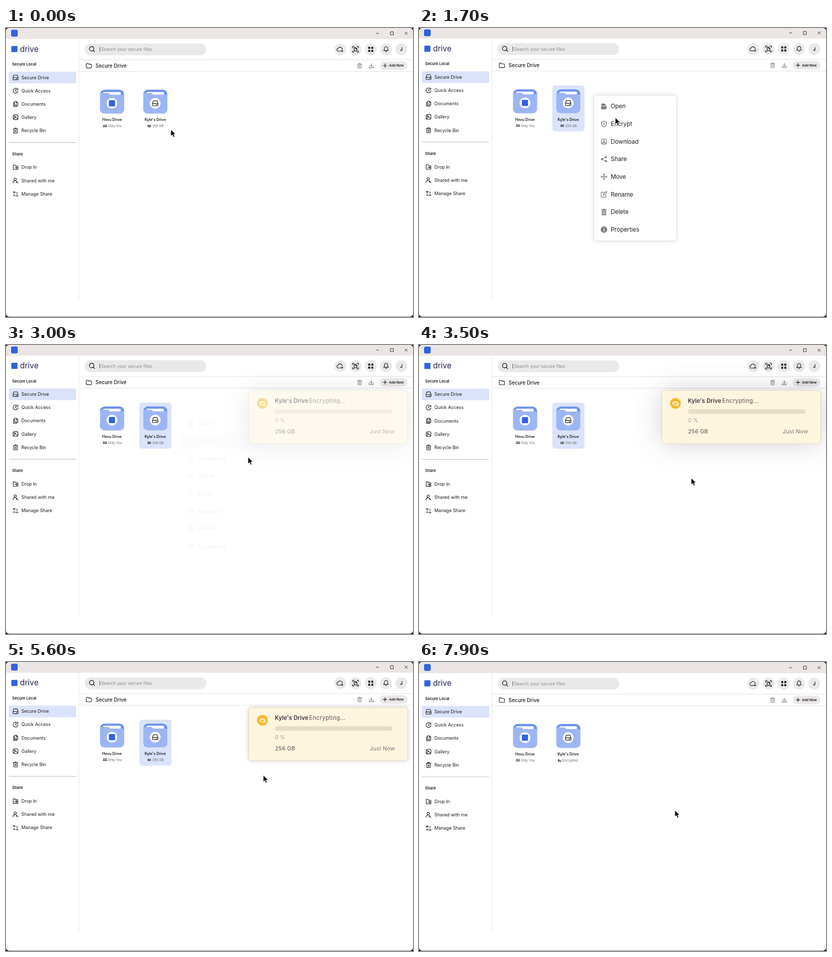
An HTML page for the animation above (8 s loop, 800x569 px).

```html
<!DOCTYPE html>
<html lang="en">
<head>
<meta charset="utf-8">
<title>Secure drive</title>
<style>
html, body { margin: 0; width: 100%; height: 100%; overflow: hidden; background: #000; }
svg { display: block; width: 800px; height: 569px; font-family: Inter, Lato, sans-serif; }
text { white-space: pre; }
</style>
</head>
<body>
<svg viewBox="0 0 800 569">
  <clipPath id="frame"><rect width="800" height="568.4" rx="6"/></clipPath>
  <g clip-path="url(#frame)">
    <rect width="800" height="569" fill="#fff"/>
    <g id="app"></g>
    <g id="menu"></g>
    <g id="card"></g>
    <path id="arrow" d="M0 0V13L3 10.2 5.2 15 7.5 14 5.4 9.3H9.4Z" fill="#000" stroke="#fff" stroke-width=".8"/>
    <path id="hand" d="M-3-6.2q1.5-1.6 2.7 0V-1.5q1.2-1 2 .2 1.3-.9 2 .4 1.6-.6 2 .9v3.6Q5.5 5.5 4.4 8h-6Q-2.6 5.6-5.8 2.2q-.8-1.6 1-1.7L-3 1.7ZM-.3-1.5V1.5M1.7-1.1V1.7M3.7-.7V2M0 4v2M2 4v2"
      fill="#fff" stroke="#111" stroke-width="1" stroke-linejoin="round"/>
  </g>
</svg>
<script>
const $ = id => document.getElementById(id);
const INK = '#1c1c1c', TINT = '#dbe3fb', BLUE = '#2f62e0';

const text = (x, yMid, size, str, attr = '') =>
  `<text x="${x}" y="${yMid + size * .36}" font-size="${size}" fill="${INK}" ${attr}>${str}</text>`;
const rect = (x, y, w, h, fill, r = 0, attr = '') =>
  `<rect x="${x}" y="${y}" width="${w}" height="${h}" rx="${r}" fill="${fill}" ${attr}/>`;
const circle = (x, y, r, fill) => `<circle cx="${x}" cy="${y}" r="${r}" fill="${fill}"/>`;
const line = (d, color, w = 1) => `<path d="${d}" fill="none" stroke="${color}" stroke-width="${w}"/>`;
const icon = (x, y, d, color = INK, scale = 1, w = 1.1) =>
  `<path transform="translate(${x} ${y}) scale(${scale})" d="${d}" fill="none" stroke="${color}" stroke-width="${w}" stroke-linecap="round" stroke-linejoin="round"/>`;
const solid = (x, y, d, color) =>
  `<path transform="translate(${x} ${y})" d="${d}" fill="${color}" fill-rule="evenodd"/>`;

const shape = {
  drive: 'M-5 .5L-3.6-3.8q.3-.8 1.2-.8h4.8q.9 0 1.2.8L5 .5V3.6q0 1-1 1H-4q-1 0-1-1ZM-5 .5H5M1.6 2.6H3',
  clock: 'M3-3.8A4.8 4.8 0 1 0 4.8 .5M0-2.6V.5L2 1.5M4.6-4.6V-2H2',
  docs: 'M-2-5H1.8L4.4-2.4V3H-2ZM1.6-5V-2.2H4.2M-2-3H-4V5H2.4V3M0 .5H2.4',
  gallery: 'M-4.7-2q0-2.7 2.7-2.7h4q2.7 0 2.7 2.7v4q0 2.7-2.7 2.7h-4q-2.7 0-2.7-2.7ZM-4 3.6L.4-.6 4 3.4M-2.8-1.6a.9.9 0 1 0 1.8 0 .9.9 0 1 0-1.8 0',
  trash: 'M-4.5-3.2h9M-1.5-3.2V-5h3v1.8M-3.5-3.2V5h7V-3.2M-.9-.8V2.6M.9-.8V2.6',
  dropIn: 'M0-2.5L-1-4.5H-4.5V4.5H4.5V-2.5H0M-1.5 1H3M1.4-.8L3.2 1 1.4 2.8',
  person: 'M-3-2.5a2.3 2.3 0 1 0 4.6 0a2.3 2.3 0 1 0-4.6 0M-5 5q0-4.4 4.2-4.4M1.2 2L4.8 5.2M1.2 4V2H3.2',
  manage: 'M-2.8-5V-1M-2.8 1V3.5H0M2 3.5H5M-5-3.2H0M2.8-3.2V0M2.8 2V5M-4.5 3.5h-.4',
  folder: 'M-5.2-3.4q0-1 1-1h2.6l1.5 1.6h4.2q1 0 1 1V3.4q0 1-1 1H-4.2q-1 0-1-1Z',
  download: 'M0-4.5V1.5M-2.6-1L0 1.6 2.6-1M-4.3 1.6V4.3H4.3V1.6',
  plus: 'M-3.6 0H3.6M0-3.6V3.6',
  cloud: 'M1 4H-3.2A2.8 2.8 0 0 1-3.6-1.6A3.8 3.8 0 0 1 3.6-1.6Q4.6-1.4 5-.4M4 1V5.4M1.8 3.2H6.2',
  scan: 'M-5.6-3V-5.6H-3M3-5.6H5.6V-3M5.6 3V5.6H3M-3 5.6H-5.6V3M-2.6-3.4H.6L2.8-1.2V3.4H-2.6ZM.4-3.2V-1H2.6',
  bell: 'M-4.6 2.8Q-3.2 1.4-3.2-1.2A3.2 3.6 0 0 1 3.2-1.2Q3.2 1.4 4.6 2.8ZM-1.2 4.8H1.2'
};

const folder = (x, y, badge) => `<g transform="translate(${x} ${y})">` +
  rect(-.6, .2, 48.2, 47.6, '#d9dde8', 9) +
  rect(0, 0, 47, 46.5, '#6d93f0', 9) +
  rect(6, 4.4, 34.5, 8, '#fff', 1.5) +
  '<path d="M0 9Q0 6.6 2.4 6.6H15.5Q17.2 6.6 18 8.2T20.5 9.8H44.6Q47 9.8 47 12V37.5Q47 46.5 38 46.5H9Q0 46.5 0 37.5Z" fill="#9cb5f5"/>' +
  circle(23.3, 26.8, 10.6, '#fff') + badge + '</g>';

function sidebar() {
  const items = [
    [97.3, 'Secure Drive', 'drive'], [123.5, 'Quick Access', 'clock'], [149.7, 'Documents', 'docs'],
    [175.8, 'Gallery', 'gallery'], [202, 'Recycle Bin', 'trash'], [274.2, 'Drop In', 'dropIn'],
    [300.3, 'Shared with me', 'person'], [326.5, 'Manage Share', 'manage']];
  return rect(10.5, 35.5, 12, 12, BLUE, 1) +
    text(27.5, 41, 15.4, 'drive', 'style="fill:#20234f"') +
    text(12, 71.3, 7.6, 'Secure Local', 'font-weight="600"') +
    rect(5.5, 86, 132.5, 23, TINT, 2) +
    line('M5.5 225.5H137.5', '#b9b9b9') +
    text(12, 248, 7.6, 'Share', 'font-weight="600"') +
    items.map(([y, label, s]) => icon(18.8, y, shape[s]) + text(30.3, y, 8.9, label)).join('') +
    line('M143.2 21V533', '#e4e4e4');
}

function header() {
  const dots = [-3, 3].map(x => [-3, 3].map(y => rect(715 + x, 40 + y, 4, 4, INK, 1)).join('')).join('');
  return rect(0, -3, 800, 24.4, '#ebe5e4') + rect(10, 3.5, 13, 13.5, BLUE, 3) +
    line('M727.5 10.5H733M755.5 7.5H761.5V13.5H755.5ZM783.8 7.8L789.2 13.2M789.2 7.8L783.8 13.2', '#222', .9) +
    rect(154.5, 30.5, 239, 23.2, '#e9e9e9', 11.6) +
    icon(169, 41.5, 'M-5-.6a4.4 4.4 0 1 0 8.8 0a4.4 4.4 0 1 0-8.8 0M2.7 2.7L5.4 5.4', INK, 1, 1.3) +
    line('M184.5 37.5V46.5', '#333', .9) +
    text(187, 42.2, 8.75, 'Search your secure files', 'style="fill:#8b8b8b"') +
    [657, 687, 717, 747, 777].map(x => circle(x, 42, 11.6, '#ebe8e8')).join('') +
    icon(656.5, 41.8, shape.cloud) + icon(687, 42, shape.scan, INK, 1, 1.3) + dots +
    icon(747, 41.6, shape.bell) +
    text(777, 42.2, 8.6, 'J', 'font-weight="700" text-anchor="middle"') +
    line('M143.5 62.5H800M143.5 85.5H800', '#e2e2e2') +
    icon(163, 74.2, shape.folder) +
    text(176, 74.4, 9.9, 'Secure Drive', 'font-weight="500"') +
    icon(695, 74.2, shape.trash, '#666', .92, .9) + icon(718, 74.4, shape.download, '#555', .95, 1) +
    rect(734.5, 65.7, 54.5, 16.8, '#ebe8e8', 8.4) + icon(745, 74, shape.plus, INK, 1, 1.2) +
    text(753, 74, 6.55, 'Add New', 'font-weight="600"');
}

function folders() {
  const name = (x, str) => text(x, 180.8, 7.25, str, 'font-weight="600" text-anchor="middle"');
  const note = (x, str) => text(x, 193, 6.45, str, 'style="fill:#666"');
  const people = [191.8, 194.5, 197.2].map(x =>
    circle(x, 191.3, 1.15, '#555') + rect(x - 1.3, 192.8, 2.6, 2.4, '#555', .8)).join('');
  return `<g id="tile">${rect(262, 113.7, 63.3, 90.8, TINT, 6)}</g>` +
    folder(185, 121.5, rect(17.3, 20.8, 12, 12, BLUE, 1)) +
    folder(270, 121.5, icon(23.3, 26.8, shape.drive, INK, 1.08)) +
    name(208.3, 'Hevu Drive') + name(293.3, "Kyle's Drive") + people + note(200.3, 'Only You') +
    `<g id="size">${rect(278, 190.8, 7, 4.6, '#666', 1.4)}${line('M279.4 193H283.6', '#bbb', .7)}${note(287.4, '256 GB')}</g>` +
    `<g id="locked">${solid(276, 193, 'M-3 3V-2.4H-.8L0-1.2H1V3ZM.6 0H3.2V3.2H.6Z', '#666')}${note(281, 'Encrypted')}</g>`;
}

function menu() {
  const gray = '#7c7c7c';
  const items = [
    ['Open', (x, y) => solid(x, y, 'M-5-5.5H1L4-2.6V-1H-5ZM-5.6 0H6L4.2 5.6H-5.6Z', gray)],
    ['Encrypt', (x, y) => icon(x, y, 'M0-5.6L4.8-3.8V0Q4.6 4 0 5.8Q-4.6 4-4.8 0V-3.8ZM0-.6V2.2M-.9-1.4H.9', gray, 1, 1.4)],
    ['Download', (x, y) => icon(x, y, 'M-5-3q0-2 2-2H3q2 0 2 2V3q0 2-2 2H-3q-2 0-2-2ZM0-3V.4M-1.6-1L0 .6 1.6-1M-4.6 2.4H4.6', gray, 1, 1.3)],
    ['Share', (x, y) => icon(x, y, 'M4-4L-4 0L4 4', gray, 1, 1.2) + circle(x + 4, y - 4, 2, gray) + circle(x - 4, y, 2, gray) + circle(x + 4, y + 4, 2, gray)],
    ['Move', (x, y) => icon(x, y, 'M0-5.4V5.4M-5.4 0H5.4M-1.5-4.2L0-5.6 1.5-4.2M-1.5 4.2L0 5.6 1.5 4.2M-4.2-1.5L-5.6 0-4.2 1.5M4.2-1.5L5.6 0 4.2 1.5', gray, 1, 1.3)],
    ['Rename', (x, y) => icon(x, y, 'M.5-4.2H-5.4V5.6H4V.6M-1.6 2L-1-.6 4.4-6 6-4.4 .8 1.2Z', gray, 1, 1.2)],
    ['Delete', (x, y) => solid(x, y, 'M-5-5H-1.8V-6.2H1.8V-5H5V-3.6H-5ZM-4.2-2.8H4.2V6.4H-4.2ZM-2.4-1.4V5H-1.6V-1.4ZM-.4-1.4V5H.4V-1.4ZM1.6-1.4V5H2.4V-1.4Z', gray)],
    ['Properties', (x, y) => circle(x, y, 6.3, gray) + circle(x, y - 3, .9, '#fff') + rect(x - .8, y - 1.2, 1.6, 4.8, '#fff')]];
  return rect(343.7, 132.5, 162.6, 286.5, '#fff', 5,
      'stroke="#dcd8de" stroke-width=".8" style="filter:drop-shadow(0 0 4.5px rgba(70,40,70,.17))"') +
    `<g id="row">${rect(344, 174, 162.4, 31, TINT)}</g>` +
    items.map(([label, draw], i) => {
      const y = 154.3 + i * 34.66;
      return draw(363.5, y) + text(377, y, 11.5, label);
    }).join('');
}

function card() {
  const color = c => `style="fill:${c}" letter-spacing=".15"`;
  return rect(477, 89.7, 312.6, 104.6, '#fef5df', 5, 'id="sheet" stroke="#dfd3b0" stroke-width=".9"') +
    circle(504, 114.8, 10.6, '#f5b82c') +
    icon(504, 114.8, 'M-6 0Q0-7 6 0M-6 0Q-3.4 3.4 0 3.4M-2 .2a2 2 0 1 1 3.8-1M2.4 1.8H5.6V4.6H2.4ZM3 1.8V.8q1-1 2 0v1', '#fff', 1, 1.1) +
    text(528.5, 110.2, 11.1, "Kyle's Drive", 'font-weight="600" ' + color('#3b3540')) +
    text(596, 110.2, 11.2, 'Encrypting...', 'letter-spacing=".35" style="fill:#57515c"') +
    rect(528.5, 126.5, 231.5, 9, '#e7deca', 4.5) +
    text(529, 148.3, 10, '0 %', color('#99948e')) +
    text(529, 170.2, 10.9, '256 GB', color('#57515c')) +
    text(714.8, 170.2, 10.9, 'Just Now', color('#77727a'));
}

$('app').innerHTML = header() + sidebar() + folders();
$('menu').innerHTML = menu();
$('card').innerHTML = card();

// Eased value at time t along [time, value] pairs.
function track(t, keys) {
  let i = 1;
  while (i < keys.length - 1 && t > keys[i][0]) i++;
  const [t0, a] = keys[i - 1], [t1, b] = keys[i];
  const u = Math.min(1, Math.max(0, (t - t0) / (t1 - t0)));
  return a + (b - a) * u * u * (3 - 2 * u);
}

const path = [
  [0, 324, 200], [200, 324, 200], [800, 314, 152], [1200, 314, 152], [2100, 437, 194], [2700, 437, 194],
  [3400, 535, 262], [3600, 535, 262], [4300, 506, 219], [5500, 506, 219], [6200, 503, 292]];
const pathX = path.map(p => [p[0], p[1]]), pathY = path.map(p => [p[0], p[2]]);

function fade(id, opacity) {
  $(id).style.opacity = opacity;
  $(id).style.display = opacity ? '' : 'none';
}

function draw(now) {
  const t = now % 8000;
  const shift = track(t, [[0, 0], [100, 0], [800, -.7], [2700, -.7], [3300, -.3], [7100, -.3], [7600, .6]]);
  $('app').setAttribute('transform', `translate(0 ${shift})`);

  const locked = track(t, [[7100, 0], [7500, 1]]);
  fade('tile', track(t, [[600, 0], [1180, 1], [7100, 1], [7500, 0]]));
  fade('size', 1 - locked);
  fade('locked', locked);
  fade('menu', track(t, [[600, 0], [1180, 1], [2650, 1], [3050, 0]]));
  fade('row', track(t, [[1900, 0], [2300, 1]]));
  fade('card', track(t, [[2750, 0], [3250, 1], [7100, 1], [7500, 0]]));

  const blur = track(t, [[3500, 26], [4100, 4.5]]);
  $('sheet').style.filter = `drop-shadow(0 0 ${blur}px rgba(60,45,80,.22))`;

  const place = `translate(${track(t, pathX)} ${track(t, pathY)})`;
  const pointing = t > 1950 && t < 2800;
  for (const [id, on] of [['arrow', !pointing], ['hand', pointing]]) {
    $(id).setAttribute('transform', place);
    $(id).style.display = on ? '' : 'none';
  }
}

const start = performance.now();
(function loop() {
  draw(performance.now() - start);
  requestAnimationFrame(loop);
})();
</script>
</body>
</html>
```
